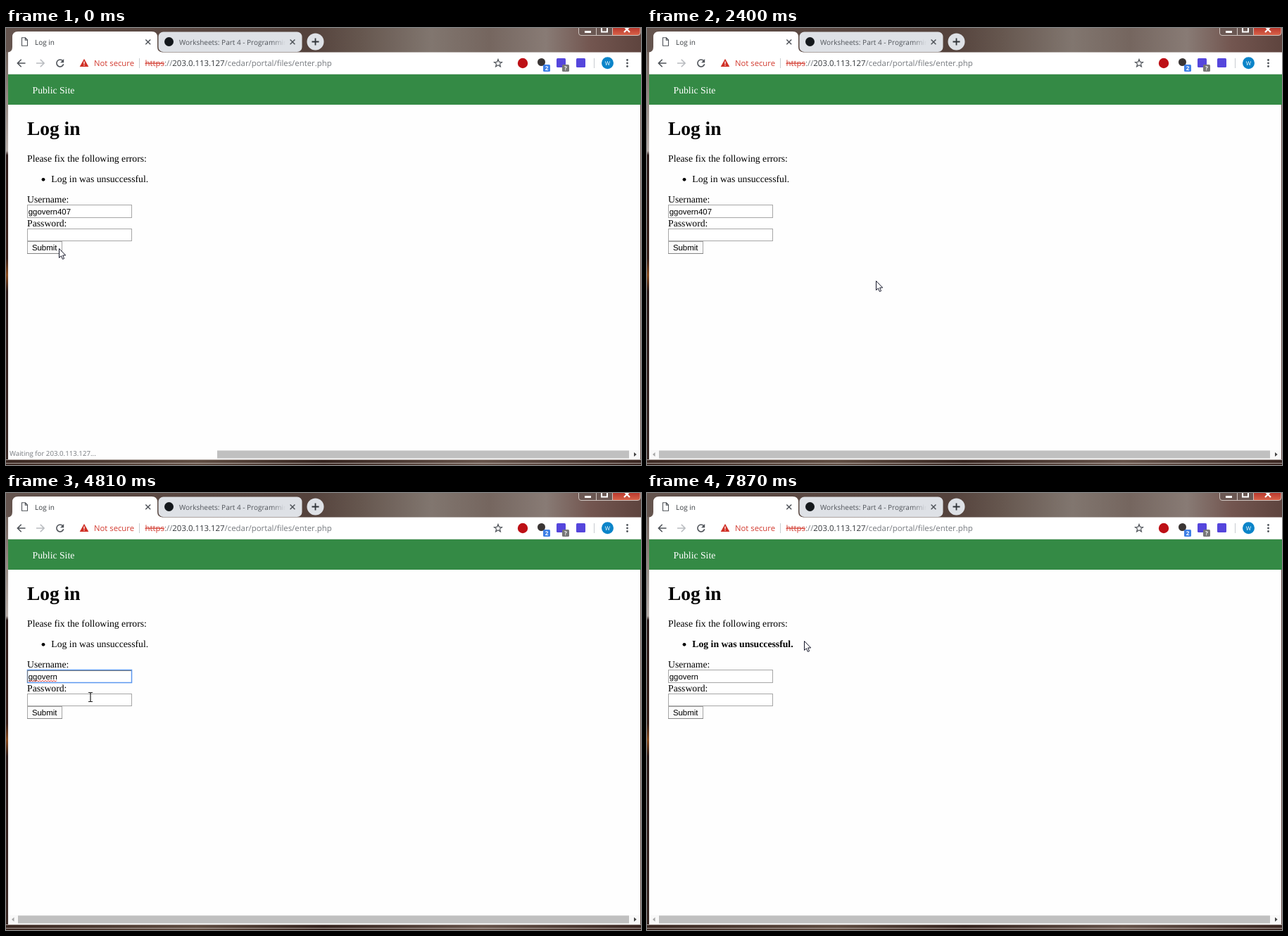
An HTML page for the animation above (8 s loop, 902 px wide and 621 px high).

```html
<!DOCTYPE html>
<html lang="en">
<head>
<meta charset="utf-8">
<title>Log in</title>
<style>
html, body { margin: 0; width: 100%; height: 100%; overflow: hidden; background: #fff; }
svg { display: block; width: 902px; height: 621px; }
text { text-rendering: geometricPrecision; white-space: pre; }
.ui { font-family: "Open Sans", "Noto Sans", sans-serif; }
.page { font-family: "Liberation Serif", "Times New Roman", serif; font-size: 13.72px; }
.field { font-family: "Liberation Sans", Arial, sans-serif; font-size: 11.43px; }
.line { fill: none; stroke: #50545a; stroke-width: 1.6; }
</style>
</head>
<body>
<svg viewBox="0 0 902 621">
  <defs>
    <linearGradient id="glass">
      <stop offset="0" stop-color="#65554f"/><stop offset=".2" stop-color="#5b4943"/>
      <stop offset=".48" stop-color="#54423c"/><stop offset=".56" stop-color="#66574f"/>
      <stop offset=".67" stop-color="#81766f"/><stop offset=".76" stop-color="#75665f"/>
      <stop offset=".85" stop-color="#887b75"/><stop offset=".92" stop-color="#735650"/>
      <stop offset="1" stop-color="#5e443e"/>
    </linearGradient>
    <linearGradient id="side" x2="0" y2="1">
      <stop offset="0" stop-color="#75665f"/><stop offset=".24" stop-color="#b9afaa"/>
      <stop offset=".25" stop-color="#2d1a18"/><stop offset=".5" stop-color="#3a2019"/>
      <stop offset=".54" stop-color="#8a4a1c"/><stop offset=".58" stop-color="#2d1a18"/>
      <stop offset="1" stop-color="#3b2925"/>
    </linearGradient>
    <linearGradient id="floor">
      <stop offset="0" stop-color="#3b2822"/><stop offset=".3" stop-color="#604d42"/>
      <stop offset=".5" stop-color="#35231e"/><stop offset=".75" stop-color="#67544b"/>
      <stop offset="1" stop-color="#3a2621"/>
    </linearGradient>
    <linearGradient id="close" x2="0" y2="1">
      <stop offset="0" stop-color="#b8342a"/><stop offset="1" stop-color="#d9654b"/>
    </linearGradient>
    <linearGradient id="fade">
      <stop offset=".88" stop-color="#dee1e6" stop-opacity="0"/><stop offset="1" stop-color="#dee1e6"/>
    </linearGradient>
    <clipPath id="tabClip"><rect x="240" y="6" width="157" height="28"/></clipPath>
  </defs>

  <!-- window frame -->
  <rect width="902" height="621" fill="url(#glass)"/>
  <rect y="34" width="3" height="587" fill="url(#side)"/>
  <rect y="613" width="902" height="8" fill="url(#floor)"/>
  <path d="M0 613.5H902M0 618.5H902" stroke="#d0c9c5" opacity=".75"/>
  <g stroke="#cfc5c0" stroke-width="1">
    <path d="M813.5 -1V7Q813.5 10.5 817 10.5H861.5V-1Z" fill="#6b5853"/>
    <path d="M861.5 -1V10.5H897Q901 10.5 901 7V-1Z" fill="url(#close)"/>
    <path d="M838.5 0V10"/>
  </g>
  <path d="M822 5.5H831" stroke="#fff" stroke-width="3"/>
  <rect x="846" y="-2" width="8" height="7.5" fill="none" stroke="#fff" stroke-width="2"/>
  <path d="M878 -2L886 6M886 -2L878 6" stroke="#fff" stroke-width="2.2"/>

  <!-- tabs and toolbar -->
  <path d="M3 34.5Q9 34 9 27V13Q9 5 17 5H207Q215 5 215 13V27Q215 34 222 34.5H902V66H3Z" fill="#fff"/>
  <rect x="216.5" y="5.5" width="204" height="28.5" rx="7" fill="#dee1e6"/>
  <circle cx="439.5" cy="19.5" r="12" fill="#dee1e6"/>
  <path class="line" d="M434.5 19.5H444.5M439.5 14.5V24.5" style="stroke:#303439;stroke-width:1.8"/>
  <path class="line" d="M22.5 13.8H27.5L30.5 17V25.3H22.5ZM27.3 14V17.3H30.5" style="stroke-width:1.1"/>
  <g class="line" style="stroke-width:1.5">
    <path d="M198.3 16.5L205.2 23.3M205.2 16.5L198.3 23.3M403.6 16.5L410.4 23.3M410.4 16.5L403.6 23.3"/>
  </g>
  <text class="ui" x="41" y="23.5" font-size="10" fill="#3a3e42">Log in</text>
  <circle cx="231.5" cy="19.5" r="6.5" fill="#14181c"/>
  <g clip-path="url(#tabClip)">
    <text class="ui" x="246" y="23.5" font-size="10" fill="#50545a">Worksheets: Part 4 - Programming</text>
    <rect x="240" y="8" width="157" height="22" fill="url(#fade)"/>
  </g>
  <path class="line" d="M27.5 50H16.5M21.7 44.7L16.4 50L21.7 55.3"/>
  <path class="line" d="M43 50H54M48.8 44.7L54.1 50L48.8 55.3" style="stroke:#b9bcc0"/>
  <path class="line" d="M80.4 46.4A5 5 0 1 0 81.7 51.3"/>
  <path d="M82.2 44V49.2H77Z" fill="#50545a"/>
  <path d="M111 43.8L117.3 55H104.7Z" fill="#d02f25"/>
  <path d="M111 47.5V51.2M111 52.3V53.6" stroke="#fff" stroke-width="1.3"/>
  <text class="ui" x="125" y="54" font-size="11.3" fill="#d23b30">Not secure</text>
  <path d="M189.5 43V57M835.5 43V57" stroke="#c9ccd0"/>
  <text class="ui" x="197.5" y="54" font-size="11.4" fill="#75797e"><tspan fill="#d23b30" text-decoration="line-through">https</tspan>://<tspan fill="#34383c">203.0.113.127</tspan>/cedar/portal/files/enter.php</text>
  <path class="line" id="star" style="stroke-width:1.2"/>
  <circle cx="734" cy="50" r="7.2" fill="#bd1016"/>
  <circle cx="760.5" cy="48.5" r="5.5" fill="#3a3534"/>
  <rect x="782" y="43" width="13" height="13" rx="1.5" fill="#5546dc"/>
  <rect x="810" y="43" width="13" height="13" rx="1.5" fill="#5546dc"/>
  <g class="ui" font-size="8" font-weight="700" text-anchor="middle" fill="#fff">
    <rect x="763" y="52" width="10" height="10" rx="1.5" fill="#3d7fe6"/>
    <text x="768" y="60">2</text>
    <rect x="790" y="52" width="10" height="10" rx="1.5" fill="#777"/>
    <text x="795" y="60">?</text>
    <circle cx="854.5" cy="49.8" r="8.5" fill="#0b84c9"/>
    <text x="854.5" y="52.8" font-weight="400">W</text>
  </g>
  <g fill="#50545a"><circle cx="882.5" cy="45.5" r="1.4"/><circle cx="882.5" cy="50" r="1.4"/><circle cx="882.5" cy="54.5" r="1.4"/></g>

  <!-- page -->
  <rect x="3" y="65" width="898" height="548" fill="#fefefe"/>
  <rect x="3" y="66" width="899" height="43" fill="#348a45"/>
  <path d="M3 65.5H902" stroke="#d6ded7"/>
  <g class="page">
    <text x="37.5" y="93" fill="#fff">Public Site</text>
    <text x="30" y="152" font-size="27.43" font-weight="700">Log in</text>
    <text x="30" y="190">Please fix the following errors:</text>
    <circle cx="53" cy="215.3" r="2.4"/>
    <text id="error" x="64.3" y="219">Log in was unsuccessful.</text>
    <text x="30" y="248">Username:</text>
    <text x="30" y="282">Password:</text>
  </g>
  <g fill="#fff" stroke="#a6a6a6">
    <rect id="userBox" x="30.5" y="251.5" width="148" height="18"/>
    <rect id="passBox" x="30.5" y="285.5" width="148" height="17"/>
    <rect id="submitBox" x="30.5" y="303.5" width="49" height="17" fill="#fafafa"/>
  </g>
  <path d="M30 320.5H80" stroke="#858585"/>
  <path id="inset" d="M30.5 269.5V252.5H178" fill="none" stroke="#777"/>
  <g class="field">
    <text id="user" x="31.7" y="264.6"></text>
    <text x="36.9" y="316.2">Submit</text>
  </g>
  <path id="squiggle" fill="none" stroke="#e0382e" stroke-width=".9"/>
  <g id="dots"></g>
  <path id="caret" stroke="#000"/>
  <g id="menu">
    <rect id="menuBox" x="29" y="271" width="151" fill="#fefefe"/>
    <rect id="hover" x="31" y="278" width="147" height="31" fill="#e9e9e9"/>
    <path id="menuSides" fill="none" stroke="#d9d9d9"/>
    <path id="menuBase" fill="none" stroke="#b4b4b4"/>
    <g id="items" class="ui" font-size="10.7" fill="#111"></g>
  </g>

  <!-- scroll bar and status -->
  <rect x="3" y="600" width="898" height="12.5" fill="#f8f8f8"/>
  <rect x="17" y="600.5" width="868" height="11" fill="#c0c0c0"/>
  <path d="M11.5 603V609L8 606Z" fill="#a5a5a5"/>
  <path d="M892 603V609L895.7 606Z" fill="#444"/>
  <g id="status">
    <rect x="3" y="597" width="297" height="16" fill="#fefefe"/>
    <text class="ui" x="5" y="608" font-size="9.7" fill="#75797e">Waiting for 203.0.113.127...</text>
  </g>

  <g id="pointer">
    <path id="arrow" d="M.5 .5V13.5L3.4 10.8L5.4 15.5L7.6 14.6L5.6 10H9.7Z" fill="#fff" stroke="#16182a"/>
    <path id="beam" d="M-3 -6.5H-1Q0 -6.5 0 -5.5Q0 -6.5 1 -6.5H3M0 -6V6M-3 6.5H-1Q0 6.5 0 5.5Q0 6.5 1 6.5H3" fill="none" stroke="#222" stroke-width="1.2"/>
  </g>
</svg>
<script>
const LOOP = 8000;
const NAME = "ggovern";
const SAVED = [NAME, NAME + "407", NAME + "728728"];
const SVG_NS = "http://www.w3.org/2000/svg";
const $ = id => document.getElementById(id);
const show = (id, on) => { $(id).style.display = on ? "" : "none"; };
const set = (id, attrs) => { for (const k in attrs) $(id).setAttribute(k, attrs[k]); };

// screen refreshes: first, last, count
const bursts = [[130, 1170, 9], [1330, 2250, 8], [2400, 3370, 8], [3500, 4500, 8],
                [4660, 5580, 8], [5730, 6660, 8], [6780, 7750, 8]];
const ticks = [0];
for (const [a, b, n] of bursts)
  for (let i = 0; i < n; i++) ticks.push(a + (b - a) * i / (n - 1));
ticks.push(7870);

// pointer path: time, x, y
const path = [[0, 75, 313], [400, 78, 308], [1000, 165, 252], [1590, 228, 231],
              [2000, 292, 305], [2400, 325, 359], [2750, 270, 325], [3200, 125, 261],
              [3500, 121, 258], [4080, 121, 258], [4400, 119.5, 290], [5100, 119.5, 290],
              [5700, 100, 296], [6500, 88, 298], [6800, 68, 313], [7060, 68, 313],
              [7450, 150, 255], [7860, 223, 210]];

function pointerAt(t) {
  const i = path.findIndex(p => p[0] > t);
  if (i < 0) return path[path.length - 1].slice(1);
  const [a, b] = [path[i - 1], path[i]];
  const u = (t - a[0]) / (b[0] - a[0]);
  const e = u * u * (3 - 2 * u);
  return [a[1] + (b[1] - a[1]) * e, a[2] + (b[2] - a[2]) * e];
}

function make(tag, parent, attrs) {
  const el = document.createElementNS(SVG_NS, tag);
  for (const k in attrs) el.setAttribute(k, attrs[k]);
  return $(parent).appendChild(el);
}

const dots = Array.from({ length: 6 }, (_, i) =>
  make("circle", "dots", { cx: 34 + i * 4, cy: 294.3, r: 1.5 }));
const items = SAVED.map((_, i) => make("text", "items", { x: 40.5, y: 297 + i * 31 }));

const starPoints = Array.from({ length: 10 }, (_, i) => {
  const r = i % 2 ? 2.5 : 5.8, a = i * Math.PI / 5;
  return (699 + r * Math.sin(a)).toFixed(1) + " " + (50.3 - r * Math.cos(a)).toFixed(1);
});
set("star", { d: "M" + starPoints.join("L") + "Z" });

let wave = "M32 266.8";
for (let x = 34; x <= 73; x += 2) wave += `L${x} ${x % 4 ? 268 : 266.4}`;
set("squiggle", { d: wave });

function drawMenu(value, open, y) {
  const match = SAVED.filter(s => s.startsWith(value));
  const end = 285 + match.length * 31;
  items.forEach((el, i) => { el.textContent = match[i] || ""; });
  set("menuBox", { height: end - 271 });
  set("menuSides", { d: `M29.5 276V${end - 3}M179.5 276V${end - 3}` });
  set("menuBase", { d: `M30 ${end - 3}Q30 ${end - .5} 33 ${end - .5}H176Q179 ${end - .5} 179 ${end - 3}` });
  show("menu", open);
  show("hover", open && y > 278);
}

function draw(now) {
  const t = ticks.filter(s => s <= now).pop();
  const [x, y] = pointerAt(t);
  const cut = [3500, 3640, 3780].filter(s => t >= s).length;
  const value = SAVED[1].slice(0, 10 - cut);
  const open = t >= 3500 && t < 4600;
  const filled = t >= 4600 && t < 7190;
  const userFocus = t >= 3300 && t < 5050;
  const passFocus = t >= 5050 && t < 6900;
  const typed = t < 5400 || t >= 7190 ? 0 : Math.min(6, 1 + Math.floor((t - 5400) / 170));

  $("user").textContent = value;
  set("userBox", { stroke: userFocus ? "#5b97ee" : filled ? "#f0f0f0" : "#a6a6a6", "stroke-width": userFocus ? 1.5 : 1 });
  set("passBox", { stroke: passFocus ? "#5b97ee" : "#a6a6a6", "stroke-width": passFocus ? 1.5 : 1 });
  show("inset", filled);
  show("squiggle", filled && userFocus);
  dots.forEach((d, i) => { d.style.display = i < typed ? "" : "none"; });

  const cx = passFocus ? 32.5 + typed * 4 : 32 + $("user").getComputedTextLength();
  const cy = passFocus ? 288 : 255;
  set("caret", { d: `M${Math.round(cx) + .5} ${cy}v12` });
  show("caret", (userFocus && !filled) || (passFocus && t < 6400 && (t - 5050) % 1000 < 500));

  drawMenu(value, open, y);
  set("error", { "font-weight": t >= 7190 ? 700 : 400 });
  show("status", t < 910 || (t >= 6920 && t < 7600));

  const inField = x > 30 && x < 179 && ((y > 252 && y < 270) || (!open && y > 285 && y < 303));
  show("arrow", !inField);
  show("beam", inField);
  set("pointer", { transform: `translate(${Math.round(x)} ${Math.round(y)})` });
}

const start = performance.now();
function loop() {
  draw((performance.now() - start) % LOOP);
  requestAnimationFrame(loop);
}
loop();
</script>
</body>
</html>
```
